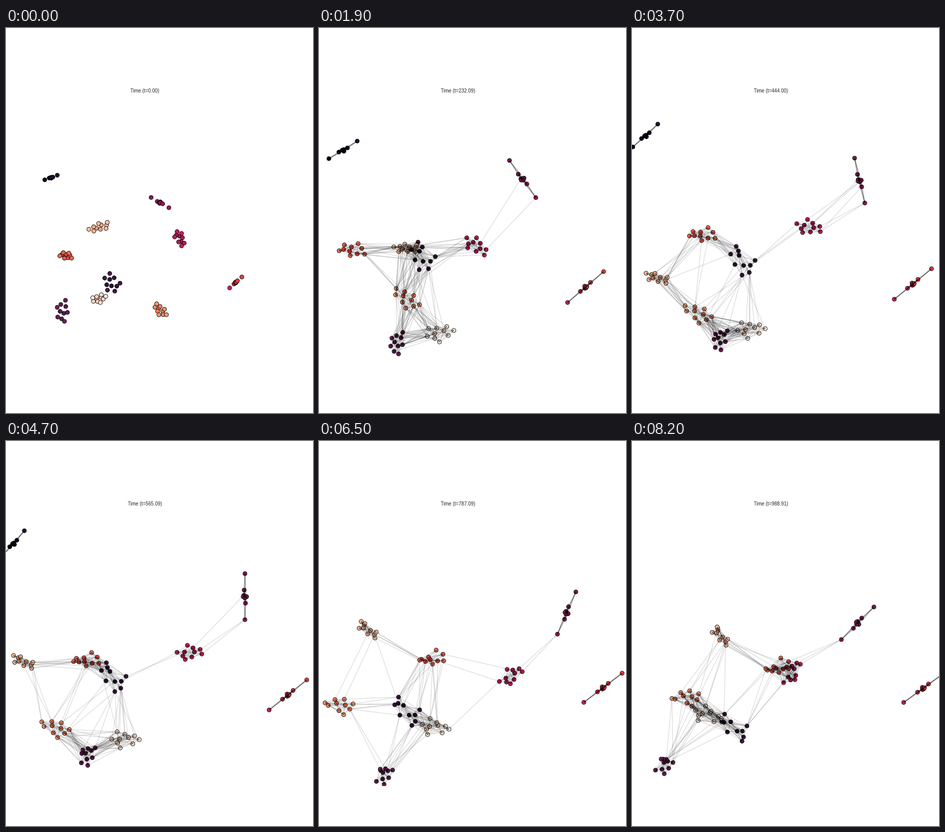
Write a matplotlib script that moves like this. It is 600 px wide and 752 px high and loops after 8.3 s.

```python
from itertools import combinations

import numpy as np
import matplotlib.pyplot as plt
from matplotlib.animation import FuncAnimation
from matplotlib.collections import LineCollection
from matplotlib.colors import LinearSegmentedColormap

W, H, FLOOR = 600, 752, 674
FRAMES, INTERVAL = 83, 100
SIZE = 10  # nodes per group
KEYS = np.array([0, 10, 23, 44, 56, 78, 98])  # time steps of the path points

rng = np.random.default_rng(7)


class Group:
    """Nodes that travel along a path while they spread out and turn."""

    def __init__(self, path, reach, turn, flat, string=False):
        self.path = np.array(path) @ [1, 1j]
        self.slope = np.gradient(self.path, KEYS)
        self.reach, self.turn, self.flat = reach, np.radians(turn), flat
        self.string = string
        self.phase = rng.uniform(0, 2 * np.pi)
        self.drift = rng.normal(0, 0.006, SIZE)
        self.across = rng.uniform(-1, 1, SIZE)

    def center(self, step):
        k = min(np.searchsorted(KEYS, step, side="right") - 1, len(KEYS) - 2)
        span = KEYS[k + 1] - KEYS[k]
        u = (step - KEYS[k]) / span
        ease = u * u * (3 - 2 * u)
        bend = (self.slope[k] * u * (1 - u) ** 2
                - self.slope[k + 1] * u * u * (1 - u))
        return self.path[k] + ease * (self.path[k + 1] - self.path[k]) + span * bend

    def shape(self, step):
        if self.string:  # tight core with far tips
            s = np.linspace(-1, 1, SIZE)
            return s ** 5 + 1j * self.flat * self.across * (1 - s * s)
        i = np.arange(SIZE)
        angle = self.phase + 2.39996 * i + self.drift * step
        r = np.sqrt((i + 0.7) / SIZE)
        return r * (np.cos(angle) + 1j * self.flat * np.sin(angle))

    def nodes(self, step):
        grown = 1 - np.exp(-step / 6)
        reach = self.reach[0] + grown * (self.reach[1] - self.reach[0])
        turn = self.turn[0] + step / KEYS[-1] * (self.turn[1] - self.turn[0])
        return self.center(step) + reach * np.exp(1j * turn) * self.shape(step)


groups = [
    Group([(88, 292), (68, 265), (47, 238), (26, 210), (14, 200), (-40, 205),
           (-45, 215)], (13, 33), (-20, -70), 0.1, string=True),
    Group([(207, 499), (182, 480), (203, 448), (216, 456), (210, 462),
           (172, 528), (200, 560)], (22, 34), (50, 40), 0.75),
    Group([(111, 553), (101, 572), (153, 616), (172, 610), (158, 616),
           (125, 655), (60, 636)], (25, 28), (100, 140), 0.5),
    Group([(301, 341), (362, 308), (398, 295), (445, 298), (467, 304),
           (484, 336), (441, 356)], (20, 45), (30, 135), 0.1, string=True),
    Group([(339, 410), (318, 411), (305, 424), (343, 388), (356, 413),
           (372, 460), (310, 455)], (18, 30), (60, -60), 0.5),
    Group([(449, 497), (488, 506), (521, 506), (549, 500), (551, 496),
           (555, 482), (569, 483)], (16, 47), (-42, -36), 0.06, string=True),
    Group([(117, 445), (74, 451), (66, 434), (140, 404), (160, 428),
           (224, 424), (288, 440)], (14, 30), (15, -20), 0.5),
    Group([(301, 551), (289, 560), (170, 529), (128, 558), (96, 561),
           (40, 517), (106, 502)], (16, 31), (45, 10), 0.6),
    Group([(182, 389), (185, 392), (170, 431), (48, 489), (32, 432),
           (93, 369), (170, 380)], (22, 27), (-15, 50), 0.4),
    Group([(181, 529), (218, 567), (234, 597), (230, 590), (230, 584),
           (224, 560), (145, 536)], (15, 31), (-20, 20), 0.6),
]
LONERS = {0, 5}
social = [g for g in range(len(groups)) if g not in LONERS]
taste = rng.uniform(0.8, 1.3, (SIZE, SIZE))  # varies which nodes pair up


def links(pts):
    """Join each group within itself, and close groups the more the nearer."""
    segs = [pair for g in pts for pair in combinations(g, 2)]
    for a, b in combinations(social, 2):
        gap = abs(pts[a].mean() - pts[b].mean())
        count = round(80 * np.exp(-(gap / 85) ** 2.1))
        dist = np.abs(pts[a][:, None] - pts[b][None, :]) * taste
        for n in np.argsort(dist, axis=None)[:count]:
            segs.append((pts[a][n // SIZE], pts[b][n % SIZE]))
    return as_xy(np.array(segs))


def as_xy(z):
    return np.stack([z.real, z.imag], axis=-1)


rocket = LinearSegmentedColormap.from_list("rocket", [
    "#03051a", "#35193e", "#701f57", "#ad1759",
    "#e13342", "#f37651", "#f6b48f", "#faebdd"])

plt.rcParams["font.family"] = "Liberation Sans"
fig = plt.figure(figsize=(W / 100, H / 100), dpi=100, facecolor="white")
ax = fig.add_axes([0, 1 - FLOOR / H, 1, FLOOR / H])
ax.set(xlim=(0, W), ylim=(FLOOR, 0))
ax.axis("off")

total = len(groups) * SIZE
dots = ax.scatter(np.zeros(total), np.zeros(total), s=33,
                  c=rocket(np.linspace(0, 1, total)),
                  edgecolors="black", linewidths=0.6, zorder=2)
lines = LineCollection([], colors="black", alpha=0.13, linewidths=1,
                       zorder=3)
ax.add_collection(lines, autolim=False)
title = ax.text(271.7, 126, "", ha="center", va="baseline", fontsize=6.85,
                color="#262626")


def draw(frame):
    step = round(frame * 1.2)
    pts = np.array([g.nodes(step) for g in groups])
    dots.set_offsets(as_xy(pts.ravel()))
    lines.set_segments(links(pts) if frame else [])
    title.set_text(f"Time (t={step * 999 / 99:.2f})")
    return dots, lines, title


anim = FuncAnimation(fig, draw, frames=FRAMES, interval=INTERVAL,
                     repeat=True, repeat_delay=0, blit=False)
plt.show()
```
